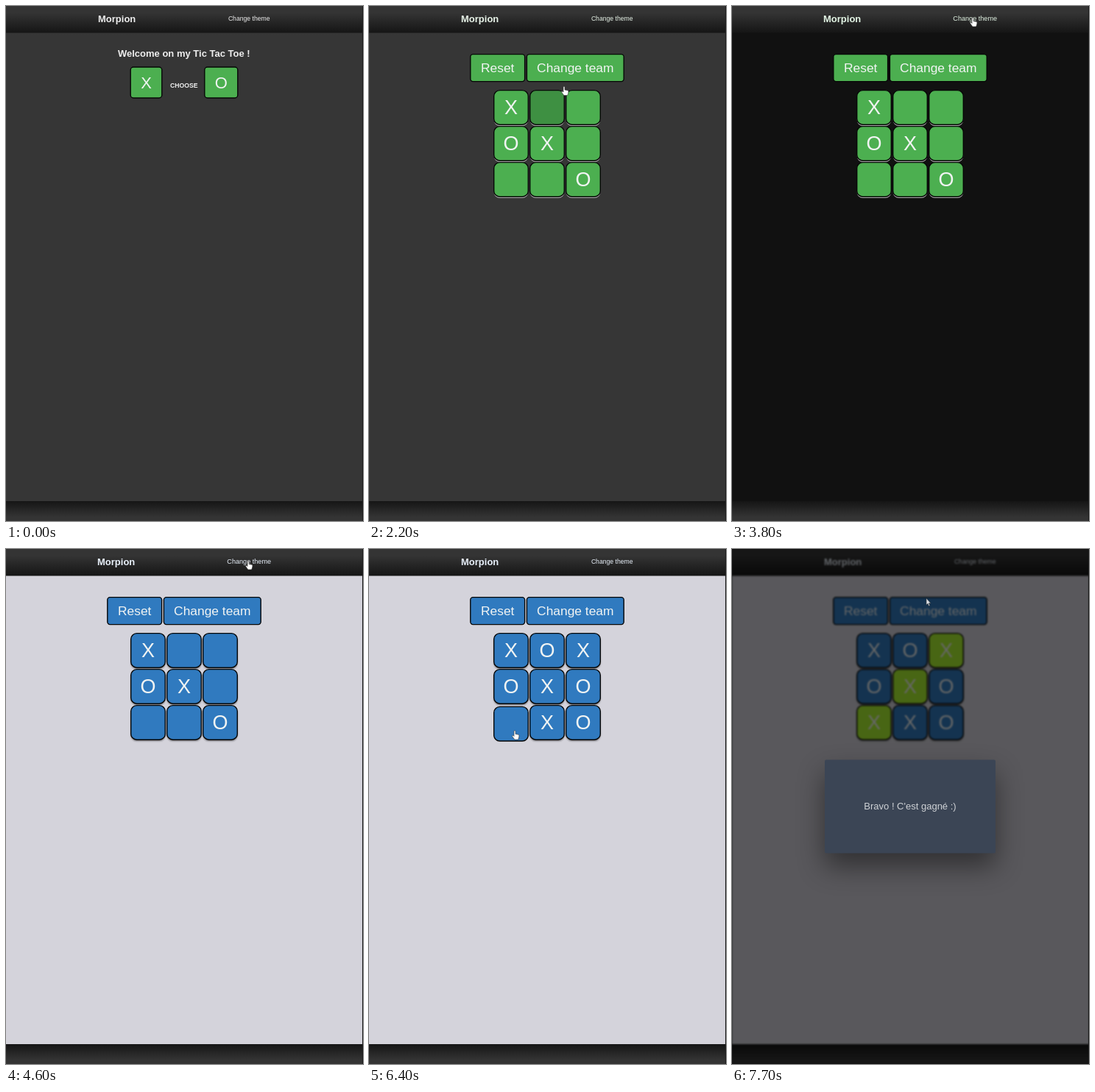
Animation of 485 by 700 pixels, one loop 8000 ms. Source, as an HTML page:

```html
<!DOCTYPE html>
<html lang="en">
<head>
<meta charset="utf-8">
<title>Tic Tac Toe</title>
<style>
  html, body { margin: 0; width: 100%; height: 100%; overflow: hidden; background: #1a1a1a; }
  svg { display: block; width: 485px; height: 700px; font-family: "Liberation Sans", Arial, sans-serif; }
  .mid { text-anchor: middle; }
  .bold { font-weight: bold; }
</style>
</head>
<body>
<svg id="stage" viewBox="0 0 485 700">
  <defs>
    <linearGradient id="bar" x2="0" y2="1">
      <stop offset=".25" stop-color="#343434"/>
      <stop offset="1" stop-color="#151515"/>
    </linearGradient>
    <linearGradient id="foot" x2="0" y2="1">
      <stop offset="0" stop-color="#151515"/>
      <stop offset=".8" stop-color="#343434"/>
    </linearGradient>
  </defs>
  <g id="page">
    <rect id="bg" width="485" height="700"/>
    <rect width="485" height="36.5" fill="url(#bar)"/>
    <rect y="673" width="485" height="27" fill="url(#foot)"/>
    <text id="brand" class="bold" y="22" font-size="13">Morpion</text>
    <text id="nav" class="mid" x="330.2" y="20.4">Change theme</text>
    <g id="choose">
      <text class="mid bold" x="241.8" y="68.6" font-size="13" fill="#eee">Welcome on my Tic Tac Toe !</text>
      <text class="mid bold" x="241.8" y="111" font-size="8.7" fill="#eee">CHOOSE</text>
    </g>
    <g id="game"></g>
  </g>
  <rect id="shade" width="485" height="700"/>
  <g id="modal">
    <rect x="126" y="286.5" width="232" height="127" rx="2" fill="#3b4555"
      style="filter: drop-shadow(0 18px 18px rgba(0,0,0,.45))"/>
    <text class="mid" x="242" y="354.3" font-size="13" fill="#cfd2d6">Bravo ! C'est gagné :)</text>
  </g>
  <rect x="484" width="1" height="700" fill="#1a1a1a"/>
  <g id="cursor" fill="#fff" stroke="#333" stroke-width=".6" stroke-linejoin="round">
    <path id="hand" d="M-1 1Q0-.6 1 1V5L5 5.8Q6 6 6 7.5L5.4 10.5L4.6 12.5H-.2L-3.4 8Q-3.4 6.4-2 7L-1 8Z"/>
    <path id="arrow" d="M0 0V9L2 7.2L3.4 10.4L4.8 9.8L3.4 6.7H6Z"/>
  </g>
</svg>
<script>
const LOOP = 8000, STEP = 100;
const BOARD_AT = 800, WIN_AT = 6500;
const GREY  = { bg: '#363636', fill: [76, 175, 80], dark: true, text: '#e8f4e9' };
const LIGHT = { bg: '#d4d3db', fill: [48, 122, 191], dark: false, text: '#e8f0fa' };
const BLACK = { bg: '#111111', fill: [76, 175, 80], dark: true, text: '#e3f5e5' };
const WIN_FILL = [173, 245, 47];
const themes = [[0, GREY], [2900, LIGHT], [3500, BLACK], [4000, GREY], [4400, LIGHT]];

// time, cell, mark
const moves = [
  [1300, 0, 'X'], [1400, 3, 'O'], [1700, 4, 'X'], [1800, 8, 'O'],
  [5600, 2, 'X'], [5700, 1, 'O'], [5900, 7, 'X'], [6000, 5, 'O'], [WIN_AT, 6, 'X']
];
const winners = [2, 4, 6];

// time, x, y of the pointer tip
const path = [
  [100, 250, 371], [600, 192, 110], [1000, 192, 110], [1300, 196, 140],
  [1700, 246, 192], [1900, 246, 192], [2200, 265, 109], [2700, 327, 15.5],
  [4000, 327, 15.5], [4400, 329, 15.5], [5200, 329, 15.5], [5600, 290, 140],
  [5900, 246, 238], [6200, 198, 246.5], [6700, 198, 246.5], [7600, 264, 67]
];

const $ = id => document.getElementById(id);
const clamp = v => Math.max(0, Math.min(1, v));
const smooth = v => { v = clamp(v); return v * v * (3 - 2 * v); };
const ramp = (t, a, b) => smooth((t - a) / (b - a));
const mix = (a, b, k) => a.map((v, i) => v + (b[i] - v) * k);
const rgb = c => `rgb(${c.map(Math.round)})`;
const show = (el, on) => el.setAttribute('display', on ? 'inline' : 'none');

function make(parent, tag, attrs) {
  const el = document.createElementNS('http://www.w3.org/2000/svg', tag);
  for (const k in attrs) el.setAttribute(k, attrs[k]);
  return parent.appendChild(el);
}

function makeButton(parent, x, y, w, h, r, size, label) {
  const shadow = make(parent, 'rect', { x, y: y + 1.8, width: w, height: h, rx: r });
  const g = make(parent, 'g', {});
  const face = make(g, 'rect', { x, y, width: w, height: h, rx: r, stroke: '#060606', 'stroke-width': 1.4 });
  const text = make(g, 'text', {
    class: 'mid', x: x + w / 2, y: y + h / 2 + size * 0.344, 'font-size': size, fill: '#f1f4f3'
  });
  text.textContent = label;
  return { x, y, w, h, shadow, g, face, text };
}

const picks = [
  makeButton($('choose'), 169.2, 83, 42.6, 42, 4, 22, 'X'),
  makeButton($('choose'), 269.8, 83, 45, 42, 4, 22, 'O')
];
const tools = [
  makeButton($('game'), 137.8, 65.6, 73.8, 37, 3.5, 17.4, 'Reset'),
  makeButton($('game'), 214.4, 65.6, 131.8, 37, 3.5, 17.4, 'Change team')
];
const cells = Array.from({ length: 9 }, (_, i) =>
  makeButton($('game'), 169.7 + i % 3 * 49, 114.6 + Math.floor(i / 3) * 49, 46.6, 46.6, 8, 27, ''));
[...picks, ...tools].forEach(b => show(b.shadow, false));

function pointer(t) {
  const i = path.findIndex(p => p[0] >= t);
  if (i < 0) return path[path.length - 1].slice(1);
  if (i === 0) return path[0].slice(1);
  const a = path[i - 1], b = path[i];
  return mix(a.slice(1), b.slice(1), ramp(t, a[0], b[0]));
}

const hits = (b, x, y) => x >= b.x && x <= b.x + b.w && y >= b.y - 6 && y <= b.y + b.h;

function drawButton(b, fill, hover) {
  b.face.setAttribute('fill', rgb(hover ? fill.map(v => v * 0.82) : fill));
}

function draw(t) {
  const theme = themes.filter(e => e[0] <= t).pop()[1];
  const [x, y] = pointer(t);
  const playing = t >= BOARD_AT, won = t >= WIN_AT;
  const active = playing ? [...cells, ...tools] : picks;
  const over = won ? null : active.find(b => hits(b, x, y));

  $('bg').setAttribute('fill', theme.bg);
  show($('choose'), !playing);
  show($('game'), playing);

  // the hovered link grows and nudges the title
  const grow = ramp(t, 2600, 3200) * (1 - ramp(t, 5200, 5500));
  $('brand').setAttribute('x', 125 - grow);
  $('nav').setAttribute('font-size', 8.65 + 0.45 * grow);
  for (const id of ['brand', 'nav']) $(id).setAttribute('fill', t < 100 ? '#eeeeee' : theme.text);

  [...picks, ...tools].forEach(b => drawButton(b, theme.fill, b === over));

  const marks = {};
  for (const [at, cell, mark] of moves) if (t >= at) marks[cell] = mark;
  const glow = ramp(t, WIN_AT, 7400);
  cells.forEach((c, i) => {
    const pressed = i === 6 && t >= 6400 && !won;
    const fill = winners.includes(i) ? mix(theme.fill, WIN_FILL, glow) : theme.fill;
    drawButton(c, fill, c === over && !marks[i] && theme.dark);
    c.text.textContent = marks[i] || '';
    c.g.setAttribute('transform', `translate(0 ${pressed ? 1.8 : 0})`);
    c.shadow.setAttribute('fill', theme.dark ? '#b0b0b0' : 'rgba(0,0,0,.5)');
    c.shadow.style.filter = theme.dark ? 'none' : 'blur(.8px)';
    show(c.shadow, !pressed);
  });

  const dim = ramp(t, 6400, 7100);
  $('page').style.filter = dim ? `blur(${1.1 * dim}px)` : 'none';
  $('shade').setAttribute('opacity', 0.58 * dim);
  $('modal').setAttribute('opacity', ramp(t, 6500, 7200));

  const link = Math.abs(x - 330) < 30 && y > 9 && y < 24;
  show($('cursor'), t >= 100);
  $('cursor').setAttribute('transform', `translate(${x} ${y})`);
  $('cursor').setAttribute('opacity', 1 - 0.15 * dim);
  show($('hand'), !!over || link);
  show($('arrow'), !over && !link);
}

const start = performance.now();
function tick() {
  const t = (performance.now() - start) % LOOP;
  draw(Math.floor(t / STEP) * STEP);
  requestAnimationFrame(tick);
}
tick();
</script>
</body>
</html>
```
